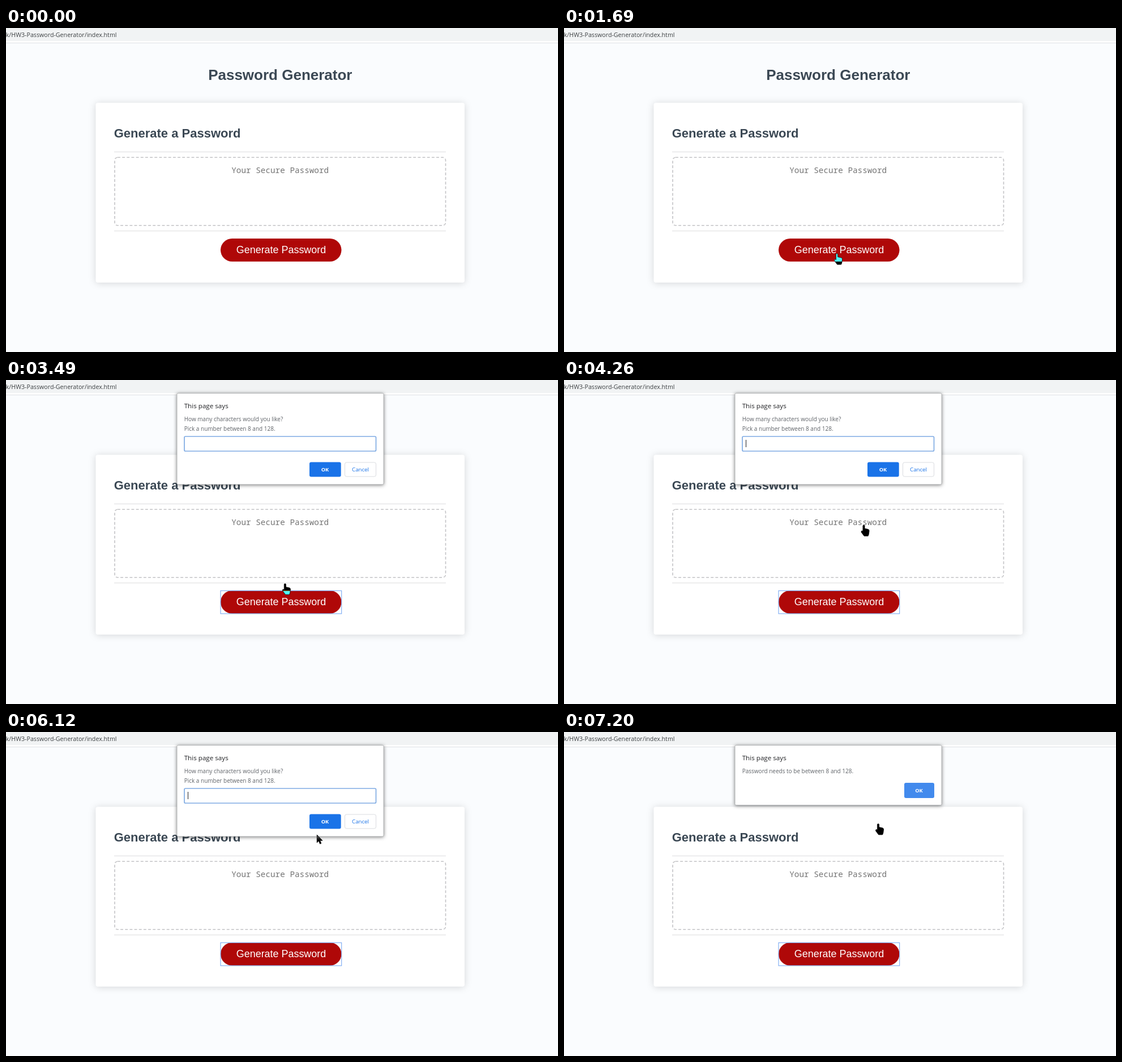
These frames come from a looping animation (975 px wide and 574 px high, 8000 ms). An HTML page:

```html
<!DOCTYPE html>
<html lang="en">
<head>
<meta charset="utf-8">
<title>Password Generator</title>
<style>
  html, body { margin: 0; width: 100%; height: 100%; overflow: hidden; background: #fafcfe; }
  #stage { position: relative; width: 975px; height: 574px; overflow: hidden; isolation: isolate; }
  svg { position: absolute; left: 0; top: 0; width: 975px; height: 574px; }
  .page { font-family: "Liberation Sans", Arial, sans-serif; fill: #3b4854; }
  .ui { font-family: "Open Sans", "Noto Sans", sans-serif; font-size: 10px; fill: #5f6368; }
  .mono { font-family: "Noto Sans Mono", monospace; font-size: 14.33px; fill: #757575; }
  .bold { font-weight: 700; }
  .mid { text-anchor: middle; }
  .card { fill: #fff; filter: drop-shadow(0 1.6px 6.5px rgba(0,0,0,.15)); }
  .box { fill: #fff; stroke: #a9abad; stroke-width: .8; filter: drop-shadow(0 1.5px 3px rgba(0,0,0,.5)); }
  .head { font-size: 11.64px; fill: #202124; }
  .ok { font-size: 9.3px; font-weight: 700; fill: #fff; }
  #prompt { transform-origin: 484.5px 104px; }
  #alert { transform-origin: 484.5px 76px; }
  #invert { mix-blend-mode: difference; }
</style>
</head>
<body>
<div id="stage">
  <svg class="page">
    <rect width="975" height="574" fill="#fafcfe"/>
    <rect width="975" height="27" fill="#fff"/>
    <rect width="975" height="23" fill="#f1f3f4"/>
    <rect y="26" width="975" height="1" fill="#dfe1e4"/>
    <text class="ui" x="195.5" y="16" text-anchor="end" style="font-size:10.67px;fill:#3c4043">k/HW3-Password-Generator/index.html</text>
    <text class="bold mid" x="484.3" y="92" font-size="26">Password Generator</text>
    <rect class="card" x="158.5" y="132.5" width="651.5" height="318.5" rx="4"/>
    <text class="bold" x="190.7" y="194.3" font-size="22">Generate a Password</text>
    <path d="M191 219.5H777M191 359.5H777" stroke="#e6e6e8" stroke-width="1.6"/>
    <rect x="192" y="229.3" width="584.5" height="120.5" rx="5" fill="none" stroke="#c3c3c6" stroke-width="1.6" stroke-dasharray="4.9 3.26"/>
    <text class="mono mid" x="484.2" y="257">Your Secure Password</text>
    <rect x="379" y="373" width="213.5" height="40.7" rx="20.35" fill="#af0808"/>
    <text class="mid" x="486" y="399.2" font-size="17.93" fill="#fff">Generate Password</text>
    <rect id="focus" x="379" y="373.3" width="213.7" height="40.7" fill="none" stroke="#79a9f2" stroke-width="1.1"/>
  </svg>

  <svg id="prompt" class="ui">
    <rect class="box" x="302" y="23.5" width="365" height="161.5" rx="2"/>
    <text class="head" x="314.7" y="50">This page says</text>
    <text x="314.7" y="73">How many characters would you like?</text>
    <text x="314.7" y="89.5">Pick a number between 8 and 128.</text>
    <rect x="315" y="100" width="338.5" height="26" rx="2" fill="#fff" stroke="#7fabe3" stroke-width="1.7"/>
    <text id="typed" x="320.8" y="116.5">7</text>
    <rect id="caret" y="106" width="1" height="13" fill="#202124"/>
    <rect id="okKey" x="536" y="145.5" width="55.7" height="26" rx="3"/>
    <text class="ok mid" x="563.5" y="162">OK</text>
    <rect x="598.5" y="146" width="55" height="25" rx="3" fill="#fff" stroke="#dadce0"/>
    <text class="mid" x="626" y="162" style="font-size:9.7px;fill:#1a73e8">Cancel</text>
  </svg>

  <svg id="alert" class="ui">
    <rect class="box" x="302" y="23.5" width="365" height="106" rx="2"/>
    <text class="head" x="314.7" y="50">This page says</text>
    <text x="314.7" y="73">Password needs to be between 8 and 128.</text>
    <rect x="601" y="90" width="53" height="27" rx="3" fill="#428aed"/>
    <text class="ok mid" x="627" y="107">OK</text>
  </svg>

  <svg id="invert"><path class="cursor" fill="#fff"/></svg>
  <svg><path class="cursor" fill="none" stroke="#000" stroke-width=".7"/></svg>
  <svg id="ripple">
    <circle id="halo" fill="#fff" fill-opacity=".2"/>
    <circle id="dot" r="10" fill="#e6dc30" fill-opacity=".75"/>
  </svg>
</div>

<script>
const LOOP = 8000;
const $ = id => document.getElementById(id);
const cursors = document.querySelectorAll(".cursor");

const SHAPES = {
  arrow: "M0 0V14L3.2 11L5.3 16.2L7.6 15.2L5.5 10.2H9.8Z",
  beam: "M-3-8H3V-7H.6V7H3V8H-3V7H-.6V-7H-3Z",
  hand: "M-1.6.6Q0-1.6 1.6.6V5.6L8 7Q9.8 8 9.6 10L8.8 16L7.6 19H.6L-4.4 12.2Q-4.8 9.6-3 9.6L-1.6 10.6Z"
};

// start, end, steps, control point, end point
const START = [925, 592];
const MOVES = [
  [590, 1140, 8, [640, 400], [475, 336]],
  [1310, 1690, 6, [443, 372], [482, 400]],
  [3490, 3720, 4, [505, 320], [518, 258]],
  [3860, 3860, 1, [520, 259], [520, 259]],
  [4010, 4100, 2, [523, 262], [526, 262]],
  [4180, 4410, 4, [531, 256], [530, 256]],
  [4640, 5430, 11, [536, 226], [532, 226]],
  [5510, 5510, 1, [531, 227], [531, 227]],
  [5740, 6340, 9, [548, 190], [555, 163]]
];
const CLICKS = [2650, 6810];
const PRESS = 205;
const PROMPT_AT = 2860, TYPED_AT = 6340, CLOSE_AT = 7020, ALERT_AT = 7110;
const SETTLE = 75;
const CARET_OFF = [[3320, 3860], [4410, 4880], [5430, 5940]];

const within = (v, a, b) => v >= a && v < b;

function pointer(t) {
  let from = START;
  for (const [t0, t1, n, mid, to] of MOVES) {
    if (t < t0) break;
    if (t < t1) {
      const p = (Math.floor((t - t0) / (t1 - t0) * (n - 1) + .02) + 1) / n;
      const q = 1 - p;
      return from.map((a, i) => q * q * a + 2 * q * p * mid[i] + p * p * to[i]);
    }
    from = to;
  }
  return from;
}

function cursorKind(t, x, y) {
  if (t >= PROMPT_AT) return t < ALERT_AT && y < 185 ? "arrow" : "hand";
  if (within(x, 191, 777) && within(y, 229, 351)) return "beam";
  if (within(x, 379, 593) && within(y, 373, 414)) return "hand";
  return "arrow";
}

function show(el, on) {
  el.style.visibility = on ? "visible" : "hidden";
}

function showDialog(el, t, from, to) {
  const opening = t < from + SETTLE;
  const closing = t >= CLOSE_AT && to < LOOP;
  show(el, within(t, from, to));
  el.style.opacity = closing ? .4 : opening ? .87 : 1;
  el.style.transform = opening || closing
    ? "translateY(-6px) perspective(1000px) rotateX(3.9deg) scale(1.0055)" : "none";
}

function draw(t) {
  const [x, y] = pointer(t);
  const kind = cursorKind(t, x, y);
  for (const c of cursors) {
    c.setAttribute("d", SHAPES[kind]);
    c.setAttribute("transform", `translate(${x} ${y})`);
    show(c, t >= MOVES[0][0]);
  }

  show($("focus"), t >= CLICKS[0]);
  showDialog($("prompt"), t, PROMPT_AT, ALERT_AT);
  showDialog($("alert"), t, ALERT_AT, LOOP);

  const open = within(t, PROMPT_AT, ALERT_AT);
  const typed = t >= TYPED_AT;
  show($("typed"), open && typed);
  show($("caret"), open && !CARET_OFF.some(([a, b]) => within(t, a, b)));
  $("caret").setAttribute("x", typed ? 327 : 321);
  $("okKey").setAttribute("fill", y < 171 ? "#287be9" : "#1a73e8");

  const click = CLICKS.find(c => within(t, c, c + PRESS));
  show($("ripple"), click !== undefined);
  if (click !== undefined) {
    for (const id of ["halo", "dot"]) {
      $(id).setAttribute("cx", x);
      $(id).setAttribute("cy", y - .5);
    }
    $("halo").setAttribute("r", Math.min(17, 10 + (t - click) / 20));
  }
}

const begin = performance.now();
function tick() {
  draw((performance.now() - begin) % LOOP);
  requestAnimationFrame(tick);
}
tick();
</script>
</body>
</html>
```
